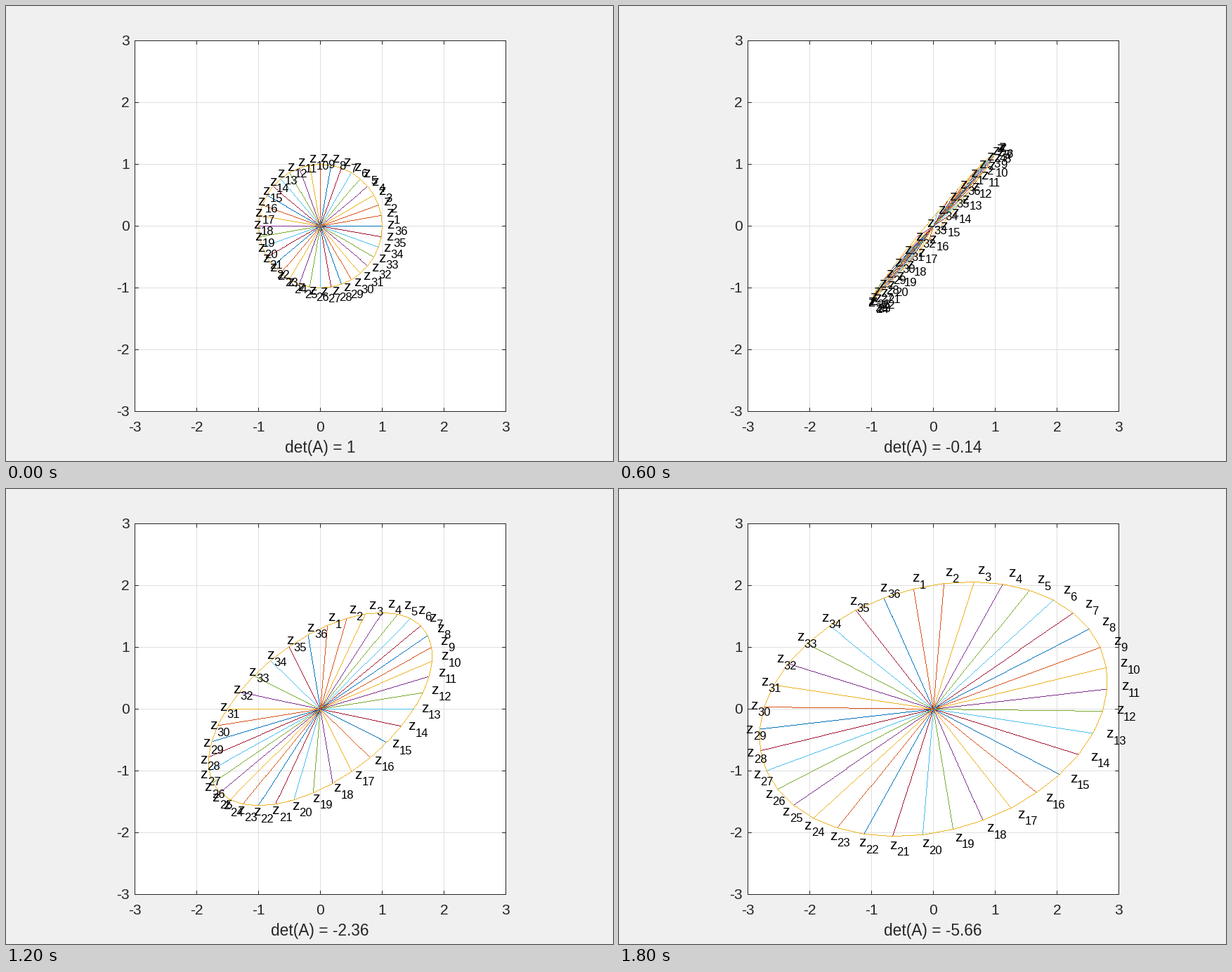
These frames come from a looping animation (864x648 px, 2 s). A matplotlib script:

```python
import numpy as np
import matplotlib.pyplot as plt
from matplotlib.animation import FuncAnimation
from matplotlib.colors import to_rgba
from matplotlib.patches import Rectangle

W, H, DPI = 864, 648, 100
CX, CY, UNIT = 447.5, 313.5, 88      # origin and one data unit, in pixels
LEFT, RIGHT = CX - 3 * UNIT, CX + 3 * UNIT
TOP, BOTTOM = CY - 3 * UNIT, CY + 3 * UNIT
STEPS = 10
LABEL_SCALE = 1.08
LABEL_SIZE = 20.8
DARK = "#262626"
COLORS = [to_rgba(c) for c in ("#0072BD", "#D95319", "#EDB120", "#7E2F8E",
                               "#77AC30", "#4DBEEE", "#A2142F")]
PX = 72 / DPI

plt.rcParams["font.family"] = "Liberation Sans"
fig = plt.figure(figsize=(W / DPI, H / DPI), dpi=DPI, facecolor="#F0F0F0")
ax = fig.add_axes([0, 0, 1, 1])
ax.axis("off")


def line(xs, ys, color=DARK, z=1):
    ax.plot(xs, ys, color=color, lw=PX, zorder=z, snap=False,
            solid_capstyle="projecting", solid_joinstyle="miter")


def write(x, y, s, size, color="black", ha="left"):
    return ax.text(x, y, s, fontsize=size * PX, color=color, ha=ha,
                   va="baseline", zorder=5)


def to_px(points):
    return np.array([CX, CY]) + points * [UNIT, -UNIT]


def stroke(canvas, a, b, color):
    """Draw a hard-edged line, one pixel wide."""
    n = int(np.ceil(np.abs(b - a).max())) + 1
    cols, rows = np.floor(np.linspace(a, b, n)).astype(int).T
    canvas[rows, cols] = color


def draw_axes():
    ax.add_patch(Rectangle((LEFT, TOP), RIGHT - LEFT, BOTTOM - TOP,
                           fc="white", ec="none", zorder=0))
    for v in range(-3, 4):
        x, y = CX + v * UNIT, CY - v * UNIT
        if abs(v) < 3:
            line([x, x], [TOP, BOTTOM], "#DFDFDF", 0.5)
            line([LEFT, RIGHT], [y, y], "#DFDFDF", 0.5)
        for edge, inner in ((TOP, TOP + 5), (BOTTOM, BOTTOM - 5)):
            line([x, x], [edge, inner])
        for edge, inner in ((LEFT, LEFT + 5), (RIGHT, RIGHT - 5)):
            line([edge, inner], [y, y])
        write(x, 606, str(v), 21, DARK, "center")
        write(176, y + 7, str(v), 21, DARK, "right")
    line([LEFT, RIGHT, RIGHT, LEFT, LEFT], [TOP, TOP, BOTTOM, BOTTOM, TOP])


draw_axes()

# 37 directions: the last repeats the first and closes the outline
theta = np.radians(10 * np.arange(1, 38))
circle = np.array([np.cos(theta), np.sin(theta)])

shape = ax.imshow(np.zeros((H, W, 4)), extent=(0, W, H, 0), aspect="auto",
                  interpolation="nearest", zorder=2)
ax.set_xlim(0, W)
ax.set_ylim(H, 0)
labels = [(write(0, 0, "z", LABEL_SIZE),
           write(0, 0, str(k), LABEL_SIZE * 0.8)) for k in range(1, 37)]
caption = write(447, 636, "", 22.8, DARK, "center")


def update(i):
    t = i / STEPS
    A = np.array([[1 - 2 * t, 3 * t], [2 * t, 1]])
    points = (A @ circle).T
    ends = to_px(points)

    canvas = np.zeros((H, W, 4))
    for k, end in enumerate(ends):
        stroke(canvas, np.array([CX, CY]), end, COLORS[k % len(COLORS)])
    for a, b in zip(ends, ends[1:]):
        stroke(canvas, a, b, COLORS[2])
    shape.set_data(canvas)

    for (z, sub), (x, y) in zip(labels, to_px(points * LABEL_SCALE)):
        z.set_position((x, y + 3.5))
        sub.set_position((x + LABEL_SIZE / 2, y + 13))
    caption.set_text(f"det(A) = {np.linalg.det(A):.4g}")
    return []


anim = FuncAnimation(fig, update, frames=STEPS, interval=200,
                     repeat=True, repeat_delay=0, blit=False)
plt.show()
```
